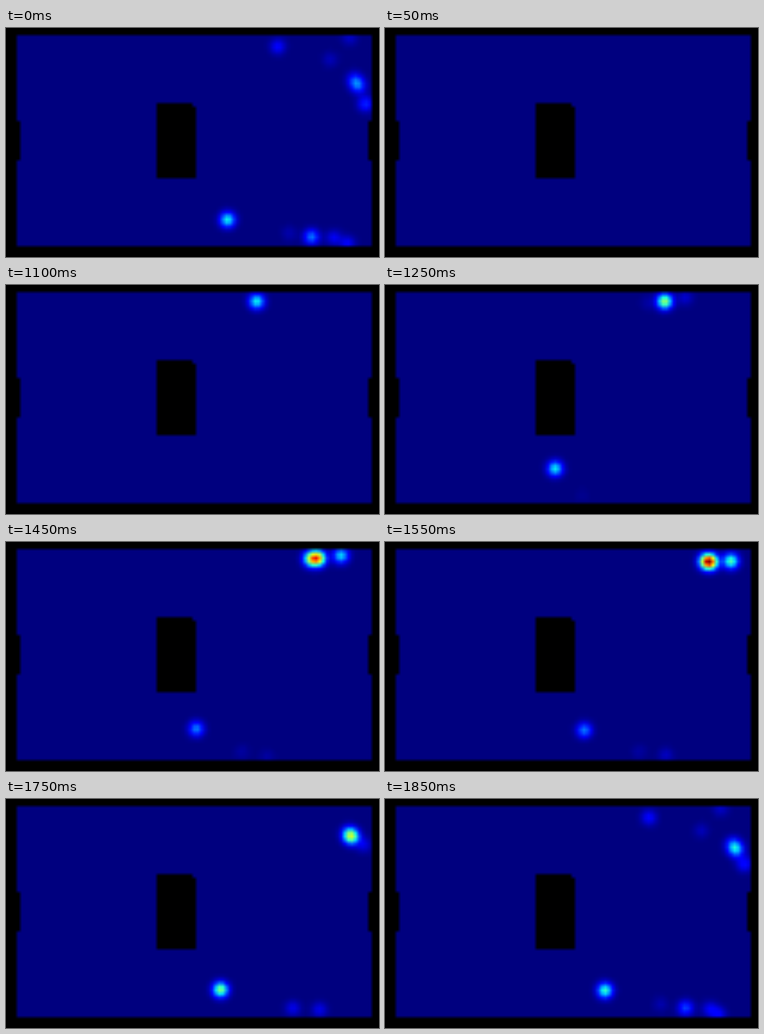
A matplotlib script for the animation above (1.9 s loop, 520 by 320 pixels).

```python
import numpy as np
import matplotlib.pyplot as plt
from matplotlib.animation import FuncAnimation

W, H, CELL = 520, 320, 5
STEP, FRAMES = 50, 38
LOOP = STEP * FRAMES
TURN = 1450      # ms at which the upper group bends towards the exit
SIGMA = 7.4


def floor_plan():
    floor = np.zeros((H // CELL, W // CELL))
    floor[2:61, 3:102] = 1
    floor[26:37, [3, 101]] = 0   # doors
    floor[21:42, 42:53] = 0      # block
    floor[21, 52] = 1
    return floor


FLOOR = floor_plan()
GX, GY = np.meshgrid((np.arange(W // CELL) + .5) * CELL,
                     (np.arange(H // CELL) + .5) * CELL)


def walker(start, a, b, heats, slow=1.0, drop=0):
    """Walk from a to b, slowing down; heats are spread evenly over the walk."""
    def at(t):
        u = (t - start) / (LOOP - start)
        if u < 0:
            return 0, 0, 0
        ease = 1 - (1 - u) ** slow
        bend = max(0, (t - TURN) / (LOOP - TURN)) ** 1.65
        x = a[0] + (b[0] - a[0]) * ease
        y = a[1] + (b[1] - a[1]) * ease + drop * bend
        return x, y, np.interp(u, np.linspace(0, 1, len(heats)), heats)
    return at


WALKERS = [
    # upper corridor
    walker(900, (288, 23), (491, 23), (.03, .46, .64, .64, .2), 1.62, 58),
    walker(1250, (366, 25), (486, 22), (.03, .5, .5, .2, .15), 1.85, 50),
    walker(1150, (385, 17), (501, 20), (.03, .1, .5, .07, .16), 2.4, 86),
    # lower corridor
    walker(1150, (222, 254), (309, 268), (.4, .33, .2, .54, .37), 1.35),
    walker(1250, (275, 294), (426, 292), (.015, .03, .03, .08, .24), 1.2),
    walker(1450, (364, 300), (457, 293), (.03, .09, .1), 1.4),
]
# faint latecomers, by final place and heat
WALKERS += [
    walker(1750, (x - 33, y), (x, y), (0, heat, heat))
    for x, y, heat in [(379, 26, .12), (452, 44, .05), (479, 14, .06),
                       (476, 301, .11), (395, 287, .04)]
]


def heat_at(t):
    heat = np.zeros_like(FLOOR)
    for at in WALKERS:
        x, y, amp = at(t)
        heat += amp * np.exp(-((GX - x) ** 2 + (GY - y) ** 2) / (2 * SIGMA ** 2))
    return np.clip(heat, 0, 1)


def render(i):
    t = i * STEP if i else LOOP   # the loop opens on the last moment
    return plt.cm.jet(heat_at(t))[..., :3] * FLOOR[..., None]


fig = plt.figure(figsize=(W / 100, H / 100), dpi=100, facecolor="black")
ax = fig.add_axes([0, 0, 1, 1])
ax.axis("off")
image = ax.imshow(render(0), interpolation="bilinear", aspect="auto",
                  extent=(0, W, H, 0))


def update(i):
    image.set_data(render(i))
    return [image]


anim = FuncAnimation(fig, update, frames=FRAMES, interval=STEP,
                     repeat=True, repeat_delay=0, blit=False)
plt.show()
```
